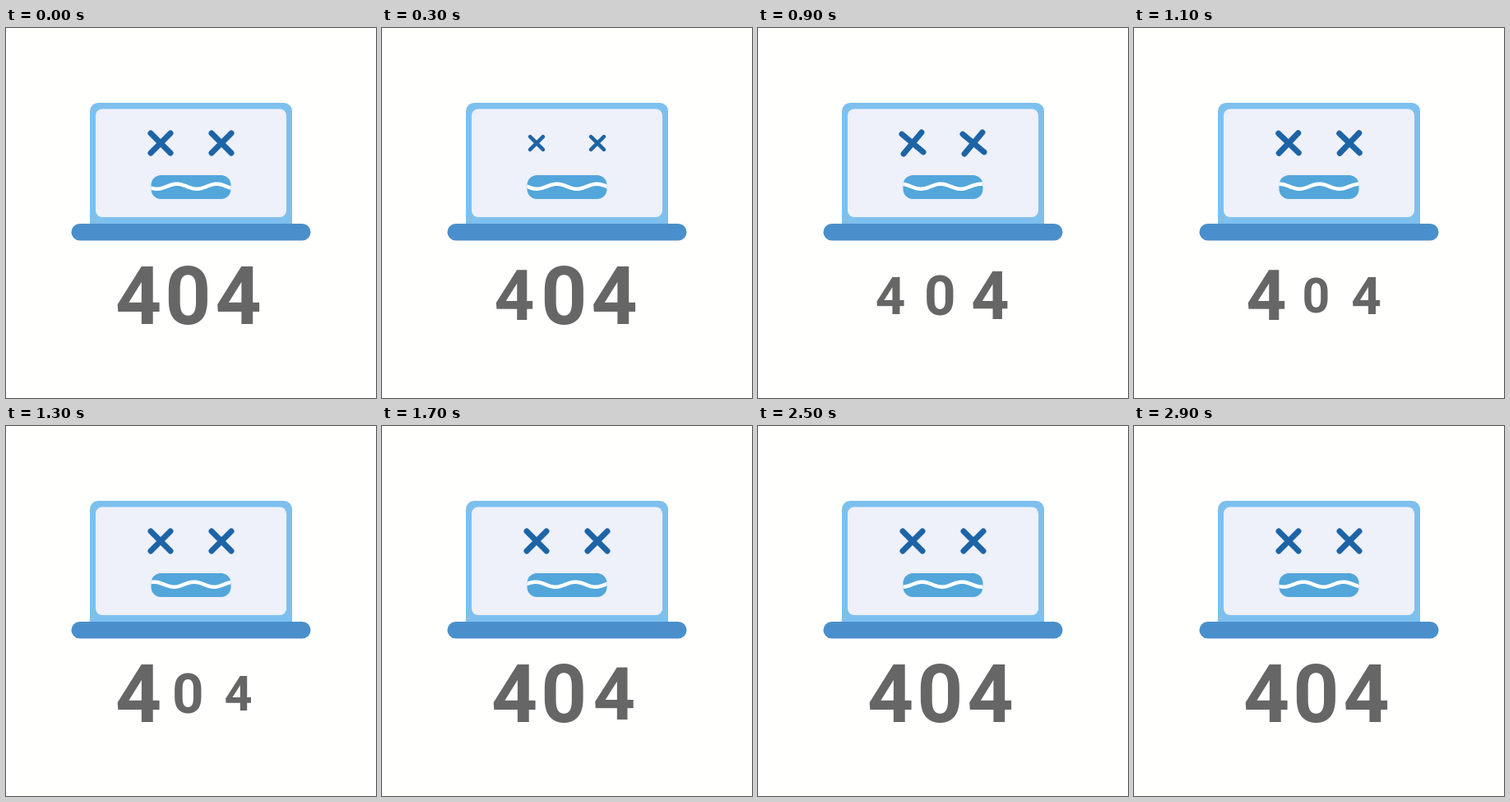
These frames come from a looping animation (450 px wide and 450 px high, 3000 ms). An HTML page:

```html
<!DOCTYPE html>
<html lang="en">
<head>
<meta charset="utf-8">
<style>
  html, body { margin: 0; width: 100%; height: 100%; overflow: hidden; background: #fffffd; }
  svg { display: block; width: 100vw; height: 100vh; }
  text { font: bold 98px Roboto, sans-serif; text-anchor: middle; fill: #666; }
  .eye { stroke: #1d64a6; stroke-width: 7; stroke-linecap: round; }
</style>
</head>
<body>
<svg viewBox="0 0 450 450">
  <clipPath id="lips"><rect x="176.5" y="179" width="97" height="29" rx="12"/></clipPath>
  <path d="M102 240V101a10 10 0 0 1 10-10H338a10 10 0 0 1 10 10V240Z" fill="#7dc0ee"/>
  <rect x="109" y="98.5" width="232" height="131.5" rx="8" fill="#eef0fa"/>
  <rect x="79.5" y="238" width="291" height="20.5" rx="10.2" fill="#4a8fcb"/>
  <path class="eye" d="M-12-12 12 12M12-12-12 12"/>
  <path class="eye" d="M-12-12 12 12M12-12-12 12"/>
  <g clip-path="url(#lips)">
    <rect x="176" y="179" width="98" height="29" fill="#52a6da"/>
    <path id="wave" fill="none" stroke="#fff" stroke-width="4.5"/>
  </g>
  <text y="35">4</text>
  <text y="35">0</text>
  <text y="35">4</text>
</svg>
<script>
  const LOOP = 3000, STEP = 100, WAVELENGTH = 48.5;
  const eyes = [...document.querySelectorAll('.eye')];
  const digits = [...document.querySelectorAll('text')];
  const wave = document.getElementById('wave');
  const eyeX = [188, 262];
  const digitX = [161, 221.3, 282.5];
  const digitTimes = [[0, 780, 1300], [450, 1100, 1750], [600, 1250, 1900]];

  // Eased bump: 0 at start, 1 at mid, 0 at end
  function bump(t, [start, mid, end]) {
    if (t <= start || t >= end) return 0;
    const p = t < mid ? (t - start) / (mid - start) : (end - t) / (end - mid);
    return (1 - Math.cos(Math.PI * p)) / 2;
  }

  function place(el, x, y, scale, angle = 0) {
    el.setAttribute('transform', `translate(${x} ${y}) rotate(${angle}) scale(${scale})`);
  }

  // The wave travels one wavelength to the right per loop
  function wavePath(progress) {
    const points = [];
    for (let x = 174; x <= 276; x += 2) {
      const phase = 2 * Math.PI * ((x - 183.5) / WAVELENGTH - progress);
      points.push(`${x} ${(192.7 + 3 * Math.cos(phase)).toFixed(2)}`);
    }
    return 'M' + points.join('L');
  }

  function draw(now) {
    const t = Math.floor(now % LOOP / STEP) * STEP;
    const eyeScale = 1 - 0.34 * bump(t, [0, 300, 600]);
    const tilt = -5 * bump(t, [600, 900, 1200]);
    eyes.forEach((el, i) => place(el, eyeX[i], 140, eyeScale, tilt));
    digits.forEach((el, i) => place(el, digitX[i], 325, 1 - 0.4 * bump(t, digitTimes[i])));
    wave.setAttribute('d', wavePath(t / LOOP));
    requestAnimationFrame(draw);
  }
  draw(performance.now());
</script>
</body>
</html>
```
